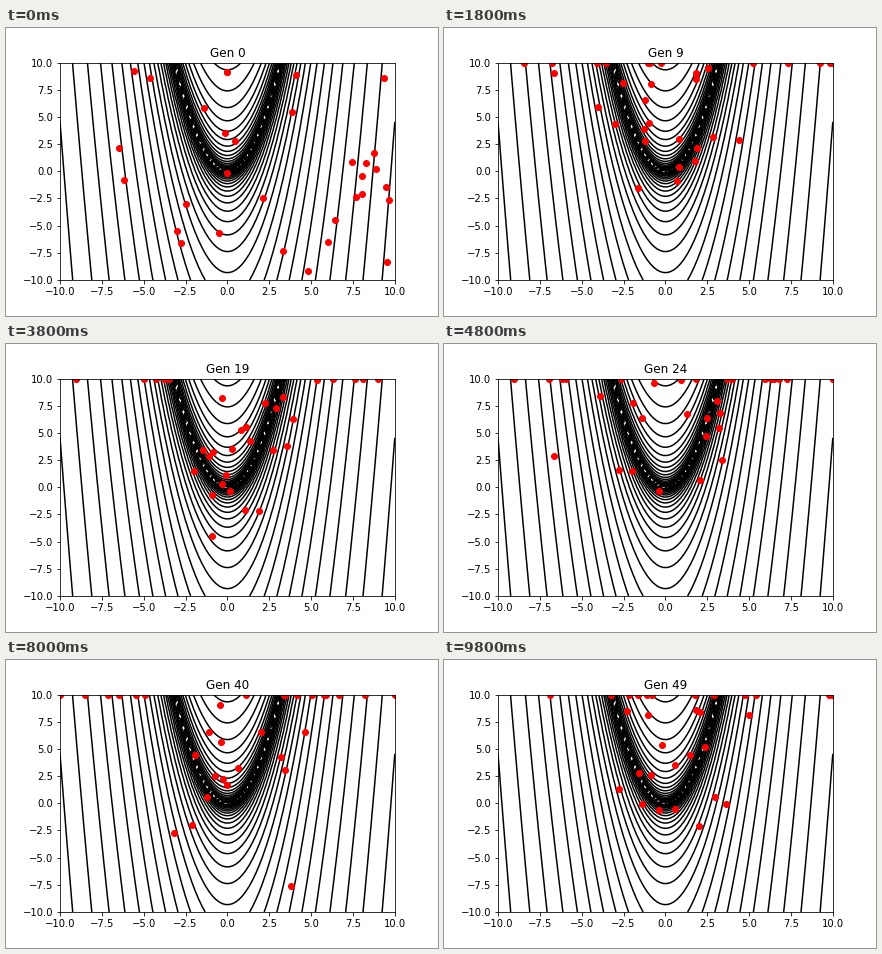
Recreate the animation shown at these times as a matplotlib script. Size 432 px wide and 288 px high, loop 10 s.

```python
import matplotlib.pyplot as plt
import numpy as np
from matplotlib.animation import FuncAnimation

GENS = 50
SIZE = 32
LIMIT = 10
TURNOVER = 0.4  # share of individuals replaced per generation


def rosenbrock(x, y):
    return (1 - x) ** 2 + 100 * (y - x ** 2) ** 2


def offspring(rng):
    """New individuals that loosely follow the valley, held inside the bounds."""
    x = rng.normal(1.2, 4.8, SIZE)
    y = 4 + 0.3 * x ** 2 + rng.normal(0, 5, SIZE)
    return np.clip(np.column_stack([x, y]), -LIMIT, LIMIT)


def evolve(seed):
    """All generations, from a uniform start."""
    rng = np.random.default_rng(seed)
    points = rng.uniform(-LIMIT, LIMIT, (SIZE, 2))
    history = [points]
    for _ in range(1, GENS):
        replaced = rng.random((SIZE, 1)) < TURNOVER
        points = np.where(replaced, offspring(rng), points)
        history.append(points)
    return history


fig, ax = plt.subplots(figsize=(6, 4), dpi=72)
fig.subplots_adjust(left=0.125, right=0.9, bottom=0.125, top=0.88)

axis = np.linspace(-LIMIT, LIMIT, 100)
X, Y = np.meshgrid(axis, axis)
ax.contour(X, Y, rosenbrock(X, Y), levels=np.logspace(-10, 10, 100),
           colors="black")
dots, = ax.plot([], [], "ro")
ax.set_xlim(-LIMIT, LIMIT)
ax.set_ylim(-LIMIT, LIMIT)
title = ax.set_title("Gen 0")

history = evolve(seed=4)


def update(gen):
    dots.set_data(*history[gen].T)
    title.set_text(f"Gen {gen}")
    return dots, title


anim = FuncAnimation(fig, update, frames=GENS, interval=200, repeat=True)
plt.show()
```
